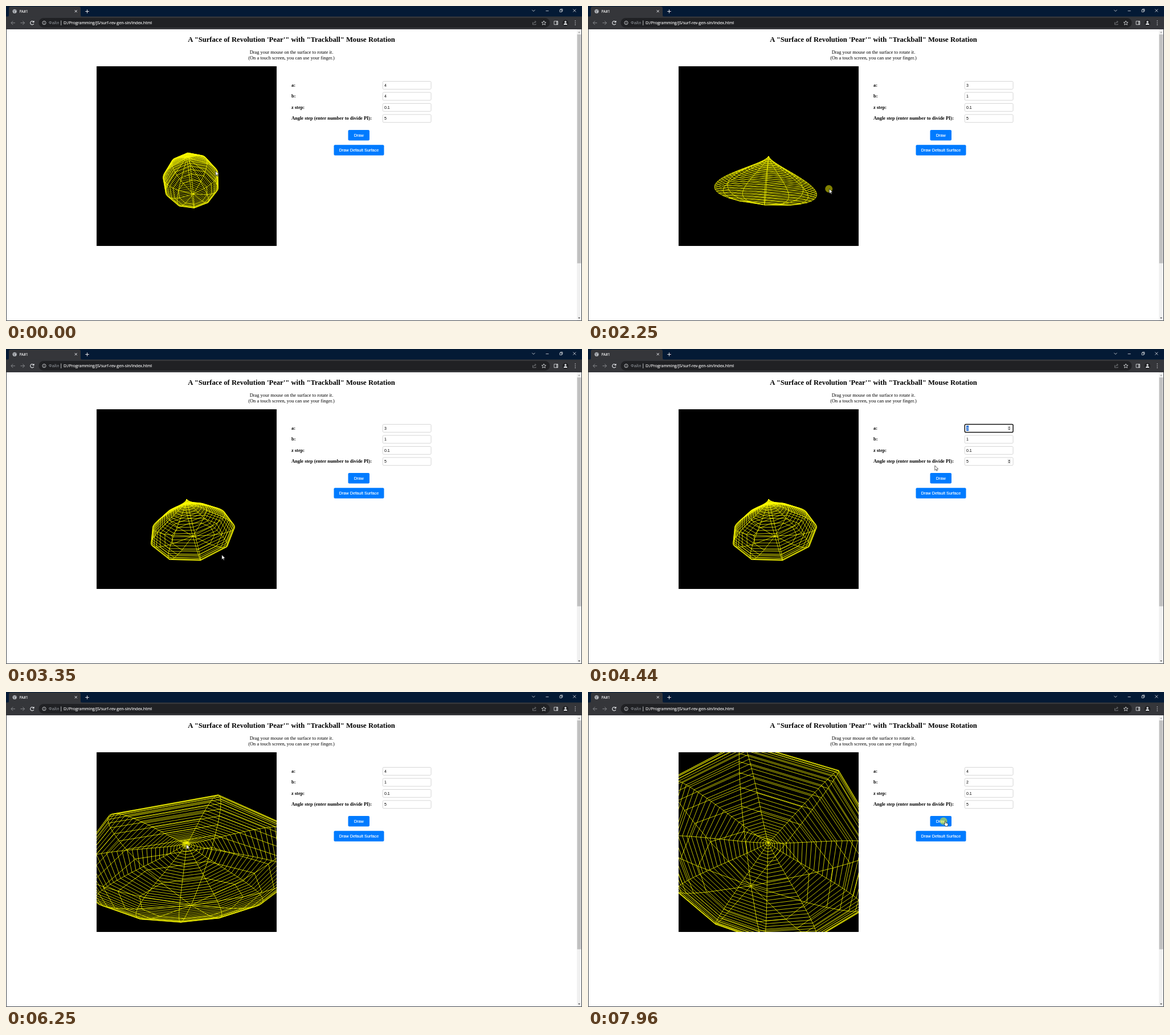
Recreate the animation shown at these times as an HTML page with a canvas. Size 1011 px wide and 554 px high, loop 8 s.

```html
<!DOCTYPE html>
<html lang="en">
<head>
<meta charset="utf-8">
<title>PA#1</title>
<style>
  html, body { margin: 0; width: 100%; height: 100%; overflow: hidden; background: #fff; }
  svg, canvas { position: absolute; left: 0; top: 0; }
  #mesh { left: 159px; top: 106px; background: #000; }
  text { white-space: pre; }
  .ui { font: 7.09px "Open Sans", sans-serif; fill: #fff; stroke: #fff; stroke-width: .12; }
  .serif { font: 8.43px "Liberation Serif", serif; }
  .mid { text-anchor: middle; }
  .bold { font-weight: bold; }
  .sans { font: 7.02px "Liberation Sans", sans-serif; }
  .btn { font: 7.37px "Liberation Sans", sans-serif; fill: #fff; stroke: #fff; stroke-width: .15; text-anchor: middle; }
  .icon { fill: none; stroke: #e4e6e9; }
  .dim { stroke: #85878b; }
</style>
</head>
<body>
<svg width="1011" height="554" viewBox="0 0 1011 554">
  <!-- window frame -->
  <rect width="1011" height="19" fill="#041a35"/>
  <path d="M2 19q3 0 3-3V4q0-3 3-3h120q3 0 3 3v12q0 3 3 3z" fill="#35363a"/>
  <rect y="18.5" width="1011" height="22.5" fill="#35363a"/>
  <circle cx="15.2" cy="9.3" r="3.6" fill="#b9bcc1"/>
  <path d="M13 7.5l2 1-1 2 2 1.5M16 6.5l1.5 2" fill="none" stroke="#55585d"/>
  <text x="23.5" y="11.8" class="ui" style="font-size:6.3px">PA#1</text>
  <path d="M120.7 7.2l4 4m0-4l-4 4M139.3 9.5h6.4m-3.2-3.2v6.4" class="icon"/>
  <path d="M923.3 6.8l2.6 2.6 2.6-2.6M947.5 8.6h5M972 6.8h3.6v3.6h-3.6zM973.2 6.6v-1.2h3.6v3.7h-1M995.3 5.5l5 5m0-5l-5 5" class="icon" stroke-width=".8"/>
  <rect x="57.5" y="21" width="897" height="17" rx="8.5" fill="#202124"/>
  <path d="M16 29.7H9m3.2-3.3l-3.3 3.3 3.3 3.3M25.5 29.7h7m-3.2-3.3l3.3 3.3-3.3 3.3" class="icon dim"/>
  <path d="M48.4 27.7a3.2 3.2 0 1 0 .4 3.3M49 26v2.4h-2.5" class="icon" stroke-width="1.1"/>
  <g class="icon" stroke-width=".8">
    <circle cx="67" cy="29.6" r="3.1"/><path d="M67 29.3v2M67 27.6v.8M96.7 25.5v8.5"/>
    <path d="M924.5 28.5v4.2h5.5v-1.5M926 31q.3-3 3.5-3.2m-1.2-1.6l2 1.6-2 1.7" class="dim"/>
    <path d="M944 26l1.1 2.5 2.7.2-2 1.8.6 2.7-2.4-1.4-2.4 1.4.6-2.7-2-1.8 2.7-.2z"/>
    <path d="M962 26.7h6.5v6H962zM966.5 27v5.5h1.7V27z"/>
  </g>
  <circle cx="982" cy="29.7" r="5.2" fill="#202124"/>
  <path d="M978.9 33q0-2.7 3.1-2.7t3.1 2.7zM982 26.3a1.7 1.7 0 1 1-.01 0z" fill="#e4e6e9"/>
  <path d="M999.2 26.3h0m0 3.4h0m0 3.4h0" stroke="#e4e6e9" stroke-width="1.5" stroke-linecap="round"/>
  <text x="75" y="32.2" class="ui" style="fill:#9aa0a6;stroke:none">Файл</text>
  <text x="101" y="32.2" class="ui">D:/Programming/JS/surf-rev-gen-sin/index.html</text>

  <!-- scrollbar and window edge -->
  <rect x="1002" y="41" width="8.5" height="512" fill="#f1f1f1"/>
  <rect x="1002.5" y="50" width="7" height="402.5" fill="#c1c1c1"/>
  <path d="M1004 47.3l2-2.3 2 2.3z" fill="#a3a3a3"/>
  <path d="M1004 547.7l2 2.3 2-2.3z" fill="#505050"/>
  <path d="M.5 41v512.5h1010V41" fill="none" stroke="#3f444b"/>

  <!-- page -->
  <text x="501" y="62.7" class="serif mid bold" style="font-size:12.64px">A "Surface of Revolution 'Pear'" with "Trackball" Mouse Rotation</text>
  <text x="501" y="84" class="serif mid">Drag your mouse on the surface to rotate it.</text>
  <text x="501" y="93.5" class="serif mid">(On a touch screen, you can use your finger.)</text>
  <g id="form"></g>
  <rect x="600.5" y="218" width="37.5" height="18.5" rx="2" fill="#007bff"/>
  <text x="619.3" y="229.7" class="btn">Draw</text>
  <rect x="575.5" y="244.3" width="88" height="18.5" rx="2" fill="#007bff"/>
  <text x="619.4" y="256.1" class="btn">Draw Default Surface</text>
</svg>
<canvas id="mesh" width="316" height="316"></canvas>
<svg width="1011" height="554" viewBox="0 0 1011 554">
  <circle id="press" r="6.5" fill="#ff0" fill-opacity=".5"/>
  <g id="pointer" fill="#fff" stroke="#000" stroke-width=".6">
    <path id="arrow" d="M0 0v8.4l1.9-1.8 1.3 2.9 1.3-.6-1.3-2.8h2.7z"/>
    <path id="hand" d="M-.6 0q.9-.7 1.4.2l.3 3 3 .7q1 .4.9 1.5l-.7 3.7H.5l-2.7-3.6q0-1.2 1.6-.2z"/>
  </g>
</svg>
<script>
const LOOP = 8000, HOLD = 100, RAD = Math.PI / 180;
const SIZE = 316, FOCAL = SIZE / 2 / Math.tan(Math.PI / 6), DIST = 10;
const STEP = 0.1, SIDES = 10;
const ROW_TOP = 132.3, ROW_GAP = 19.45;
const $ = id => document.getElementById(id);
const ctx = $('mesh').getContext('2d');

// Controls the pointer visits; run() is their effect on release.
const draw = { at: [624, 227], run: p => { p.shape = [p.values[0], p.values[1]]; } };
const drawDefault = { at: [603, 250], run: p => { p.values = [3, 1]; p.shape = [3, 1]; } };
const field = i => ({ at: [682, ROW_TOP + i * ROW_GAP + 7], field: i });
const spot = (x, y) => ({ at: [x, y] });

// Each step moves the pointer to a place; one with a pose drags the surface:
// [sideways angle of the axis, tilt to the viewer, spin] in degrees.
const startPose = [10, 67, 14];
const steps = [
  { from: 130, to: 540, on: drawDefault, click: true },
  { from: 950, to: 1250, on: spot(356, 300) },
  { from: 1270, to: 1560, on: spot(361.5, 390), pose: [-11.7, 3, 26] },
  { from: 1740, to: 2120, on: spot(436, 318), pose: [-4, 20, 18] },
  { from: 2120, to: 2840, on: spot(283.5, 358), pose: [-14.4, -5.7, 26] },
  { from: 2860, to: 3330, on: spot(378, 362), pose: [9.5, -25, 14] },
  { from: 3420, to: 3800, on: field(0), click: true, type: 4, typedAt: 4850 },
  { from: 4170, to: 4330, on: field(3) },
  { from: 4340, to: 4440, on: spot(608, 205) },
  { from: 4460, to: 4940, on: draw, click: true },
  { from: 5080, to: 5400, on: spot(321, 266) },
  { from: 5450, to: 6250, on: spot(316, 268), pose: [4.2, 41.7, 7] },
  { from: 6250, to: 6560, on: spot(340, 226), pose: [-21.9, 60.4, 4.7] },
  { from: 6600, to: 6900, on: field(1), click: true, type: 2, typedAt: 7750 },
  { from: 7260, to: 7420, on: field(3) },
  { from: 7440, to: 7930, on: draw, click: true }
];

function ease(t, from, to) {
  const k = Math.min(1, Math.max(0, (t - from) / (to - from)));
  return k * k * (3 - 2 * k);
}
const mix = (p, q, k) => p.map((v, i) => v + (q[i] - v) * k);

// Replays the steps up to time t.
function stateAt(t) {
  const p = { at: [367, 290], pose: startPose, values: [4, 4, STEP, 5], shape: [4, 4], focus: -1 };
  steps.forEach((s, i) => {
    if (t < s.from) return;
    const k = ease(t, s.from, s.to), next = steps[i + 1];
    p.at = mix(p.at, s.on.at, k);
    p.pressed = !!s.pose && (t < s.to || !!(next && next.pose));
    if (s.pose) p.pose = mix(p.pose, s.pose, k);
    if (next && next.pose && t >= s.to) p.pressed = true;
    if (!s.click || t < s.to) return;
    p.pressed = t < s.to + HOLD;
    p.focus = s.on.field ?? -1;
    p.selected = p.focus >= 0 && t > s.to + 1.5 * HOLD && t < s.typedAt;
    if (t >= s.typedAt) p.values[p.focus] = s.type;
    if (s.on.run && t >= s.to + HOLD) {
      s.on.run(p);
      p.values = [...p.values.slice(0, 2), STEP, 5];
    }
  });
  return p;
}

const labels = ['a:', 'b:', 'z step:', 'Angle step (enter number to divide PI):'];
$('form').innerHTML = labels.map((label, i) => `
  <g transform="translate(0 ${ROW_TOP + i * ROW_GAP})">
    <text x="501" y="9.7" class="serif bold">${label}</text>
    <rect class="box" x="661.3" y=".2" width="84.8" height="13.9" rx="1.8" fill="#fff"/>
    <rect class="mark" x="664" y="2.5" width="4.2" height="9" fill="#1a66d0"/>
    <text class="val sans" x="664" y="9.5"></text>
    <path class="caret" d="M668.4 3v8" stroke="#000" stroke-width=".5"/>
    <g class="spin"><rect x="736" y="2.5" width="6.5" height="9" fill="#efefef"/>
    <path d="M737.4 6.3l1.9-2.3 1.9 2.3zM737.4 7.9l1.9 2.3 1.9-2.3z" fill="#444"/></g>
  </g>`).join('');
const rows = [...$('form').children];
const show = (el, on) => el.setAttribute('visibility', on ? 'visible' : 'hidden');
const inside = ([x, y], left, top, w, h) => x >= left && x < left + w && y >= top && y < top + h;

function drawForm(p, hoverAt) {
  rows.forEach((row, i) => {
    const part = name => row.querySelector('.' + name);
    const focus = p.focus === i, selected = focus && p.selected;
    const hover = inside(hoverAt, 661, ROW_TOP + i * ROW_GAP, 85, 14);
    part('val').textContent = p.values[i];
    part('val').setAttribute('fill', selected ? '#fff' : '#000');
    part('box').setAttribute('stroke', focus ? '#101010' : '#ccc');
    part('box').setAttribute('stroke-width', focus ? 1.5 : .8);
    show(part('mark'), selected);
    show(part('caret'), focus && !selected);
    show(part('spin'), focus || hover);
  });
}

// Pear: b²(x² + y²) = z³(a − z)
function drawMesh([a, b], [side, tilt, spin]) {
  const sa = Math.sin(side * RAD), ca = Math.cos(side * RAD);
  const st = Math.sin(tilt * RAD), ct = Math.cos(tilt * RAD);
  const axis = [sa * ct, ca * ct, st], u = [ca, -sa, 0], v = [-sa * st, -ca * st, ct];
  const project = (z, k) => {
    const r = Math.sqrt(Math.max(0, z ** 3 * (a - z))) / b;
    const phi = (spin + k * 360 / SIDES) * RAD;
    const c = r * Math.cos(phi), s = r * Math.sin(phi);
    const [x, y, d] = axis.map((n, i) => z * n + c * u[i] + s * v[i]);
    const m = FOCAL / (DIST - d);
    return [SIZE / 2 + x * m, SIZE / 2 + y * m];
  };
  const line = (count, point) => {
    for (let i = 0; i <= count; i++) ctx[i ? 'lineTo' : 'moveTo'](...point(i));
  };
  const rings = Math.round(a / STEP);
  ctx.clearRect(0, 0, SIZE, SIZE);
  ctx.beginPath();
  for (let j = 1; j < rings; j++) line(SIDES, k => project(j * STEP, k));
  for (let k = 0; k < SIDES; k++) line(rings, j => project(a * j / rings, k));
  ctx.strokeStyle = '#ff0';
  ctx.lineWidth = .75;
  ctx.lineJoin = 'bevel';
  ctx.stroke();
}

function drawPointer({ at, pressed }) {
  const [x, y] = at;
  const hand = inside(at, 600.5, 218, 37.5, 18.5) || inside(at, 575.5, 244.3, 88, 18.5);
  $('pointer').setAttribute('transform', `translate(${x + (hand ? 3 : .8)} ${y})`);
  show($('arrow'), !hand);
  show($('hand'), hand);
  $('press').setAttribute('cx', x);
  $('press').setAttribute('cy', y);
  show($('press'), pressed);
}

function frame(now) {
  const t = now % LOOP, p = stateAt(t);
  drawMesh(p.shape, p.pose);
  drawForm(p, stateAt(t - HOLD).at); // hover trails the pointer slightly
  drawPointer(p);
  requestAnimationFrame(frame);
}
requestAnimationFrame(frame);
</script>
</body>
</html>
```
